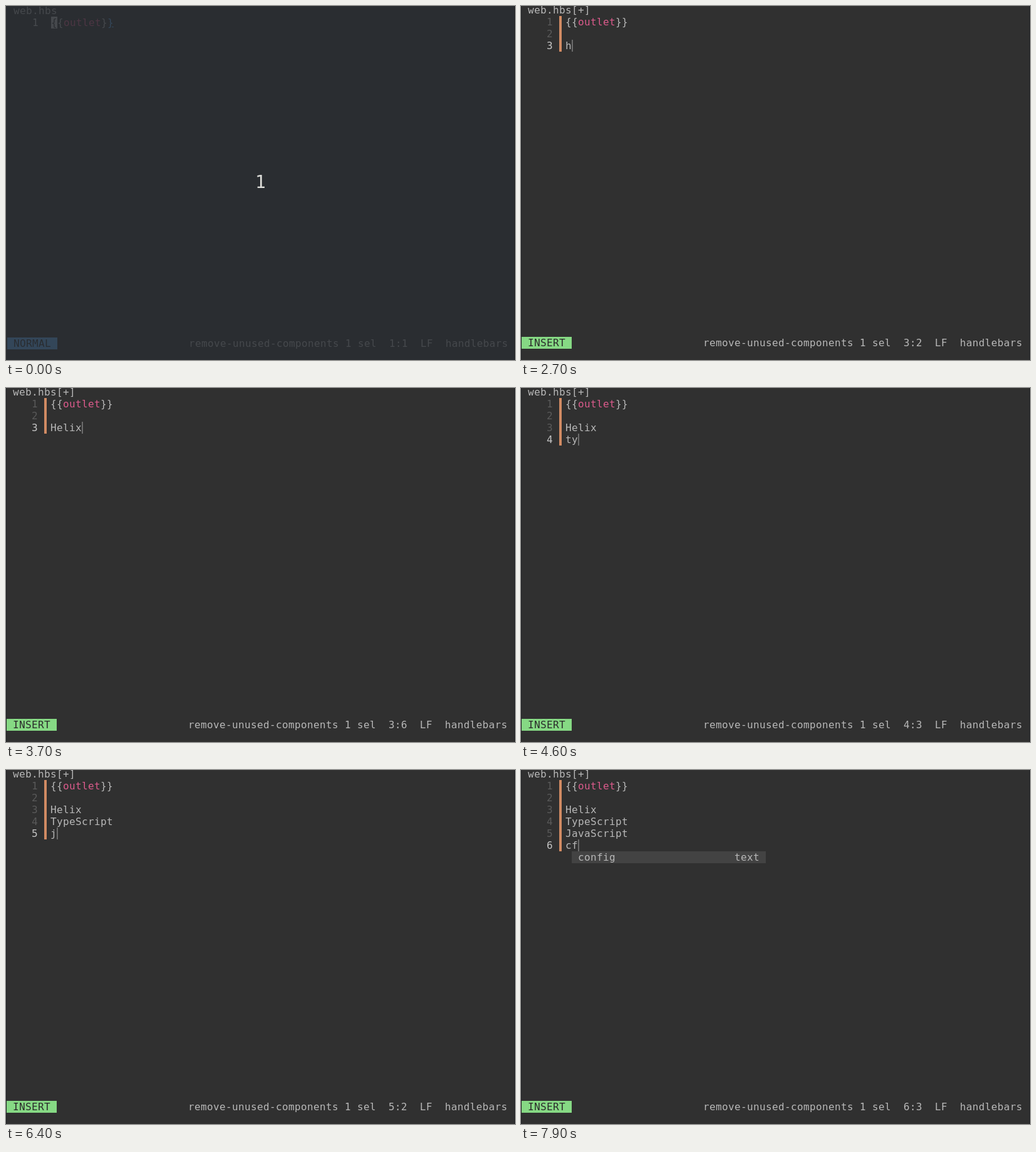
These frames come from a looping animation (813 px wide and 566 px high, 8 s). An HTML page:

```html
<!DOCTYPE html>
<html lang="en">
<head>
<meta charset="utf-8">
<title>Editor session</title>
<style>
  html, body { margin: 0; width: 100%; height: 100%; overflow: hidden; background: #303030; }
  #stage { position: relative; width: 813px; height: 566px; overflow: hidden; background: #303030; }
  #stage::before, #stage::after { content: ""; position: absolute; top: 0; width: 1px; height: 100%; background: #1d1e21; }
  #stage::before { left: 0; }
  #stage::after { right: 0; }
  #screen { position: absolute; inset: 0; color: #b8b8b8; font: 16px/19px "DejaVu Sans Mono", monospace; letter-spacing: .368px; }
  #screen span { position: absolute; height: 19px; white-space: pre; }
  #screen .dim { color: #5a5a5a; }
  #screen .now { color: #c6c6c6; }
  #screen .name { color: #dc5b8c; }
  #screen .match { color: #5fb0fc; text-decoration: underline; }
  #screen .block { background: #b8b8b8; color: #303030; }
  #screen .caret { width: 1.5px; background: #6c6c6c; }
  #screen .bar { width: 4px; background: #d18b63; }
  #screen .normal, #screen .sel { background: #5fb0fc; color: #2b2b2b; }
  #screen .insert { background: #86d984; color: #2b2b2b; }
  #screen .menu { background: #434343; }
  #screen .wide { width: 310px; }
  #screen .mode { width: 80px; }
  #shade { position: absolute; inset: 0; }
  #count { position: absolute; left: 0; top: 266px; width: 100%; text-align: center; color: #dcdcd8; font: 28px/32px "DejaVu Sans Mono", monospace; }
</style>
</head>
<body>
<div id="stage">
  <div id="screen"></div>
  <div id="shade"></div>
  <div id="count">1</div>
</div>
<script>
const LOOP = 8000;
const screen = document.getElementById("screen");
const shade = document.getElementById("shade");
const count = document.getElementById("count");

// [time, opacity] of the countdown overlay
const fades = [[0, 1], [100, .5], [600, .25], [700, 0]];

// [time, text after the first line, popup column, popup word, selected]
const one = "\n\nHelix", two = one + "\nTypeScript", three = two + "\nJavaScript";
const edits = [
  [0, ""],
  [1900, "\n"],
  [2400, "\n\n"],
  [2700, "\n\nh"],
  [2800, "\n\nhe"],
  [3000, "\n\nhe", 8, "Helix"],
  [3100, "\n\nhel", 9, "Helix"],
  [3400, one, 9, "Helix", true],
  [3700, one],
  [4200, one + "\n"],
  [4500, one + "\nt"],
  [4600, one + "\nty"],
  [4700, one + "\nty", 8, "TypeScript"],
  [4800, one + "\ntyp", 9, "TypeScript"],
  [5000, two, 9, "TypeScript", true],
  [5400, two],
  [5600, two + "\n"],
  [6400, two + "\nj"],
  [6500, two + "\nja"],
  [6600, two + "\njav", 9, "JavaScript"],
  [6700, three, 9, "JavaScript", true],
  [7100, three],
  [7400, three + "\n"],
  [7700, three + "\nc"],
  [7800, three + "\ncf"],
  [7900, three + "\ncf", 8, "config"]
];

const at = (list, t) => list.filter(item => item[0] <= t).pop();

const cell = (col, row, text, cls = "") =>
  `<span class="${cls}" style="left:${1 + col * 10}px;top:${row * 19 - 3}px">${text}</span>`;

function draw([, text, col, word, selected]) {
  const insert = text !== "";
  const lines = ("{{outlet}}" + text).split("\n");
  const last = lines.length;
  const tail = lines[last - 1];
  const pos = insert ? `${last}:${tail.length + 1}` : "1:1";
  const status = `remove-unused-components 1 sel  ${pos}  LF  handlebars`;

  let html = cell(1, 0, "web.hbs" + (insert ? "[+]" : ""));
  lines.forEach((line, i) => {
    const row = i + 1, active = row === last;
    html += cell(4, row, active && !line ? "~" : row, active ? "now" : "dim");
    if (insert && !(active && !line)) html += cell(6, row, "", "bar");
    if (i) html += cell(7, row, line);
  });

  html += cell(7, 1, "{", insert ? "" : "block") + cell(8, 1, "{") +
    cell(9, 1, "outlet", "name") + cell(15, 1, "}") + cell(16, 1, "}", insert ? "" : "match");
  if (insert) html += cell(7 + tail.length, last, "", "caret");

  if (word) {
    const style = selected ? "sel" : "menu";
    html += cell(col, last + 1, " " + word.padEnd(25) + "text", style + " wide");
  }

  html += cell(0, 28, insert ? " INSERT" : " NORMAL", (insert ? "insert" : "normal") + " mode");
  html += cell(80 - status.length, 28, status);
  screen.innerHTML = html;
}

let shown, faded;
const start = performance.now();

function tick() {
  const t = (performance.now() - start) % LOOP;
  const edit = at(edits, t), fade = at(fades, t);
  if (edit !== shown) draw(shown = edit);
  if (fade !== faded) {
    faded = fade;
    shade.style.background = `rgba(40, 44, 49, ${fade[1] * .8})`;
    count.style.opacity = fade[1];
    screen.style.transform = fade[1] ? "translate(1px, 1px)" : "none";
  }
  requestAnimationFrame(tick);
}
tick();
</script>
</body>
</html>
```
